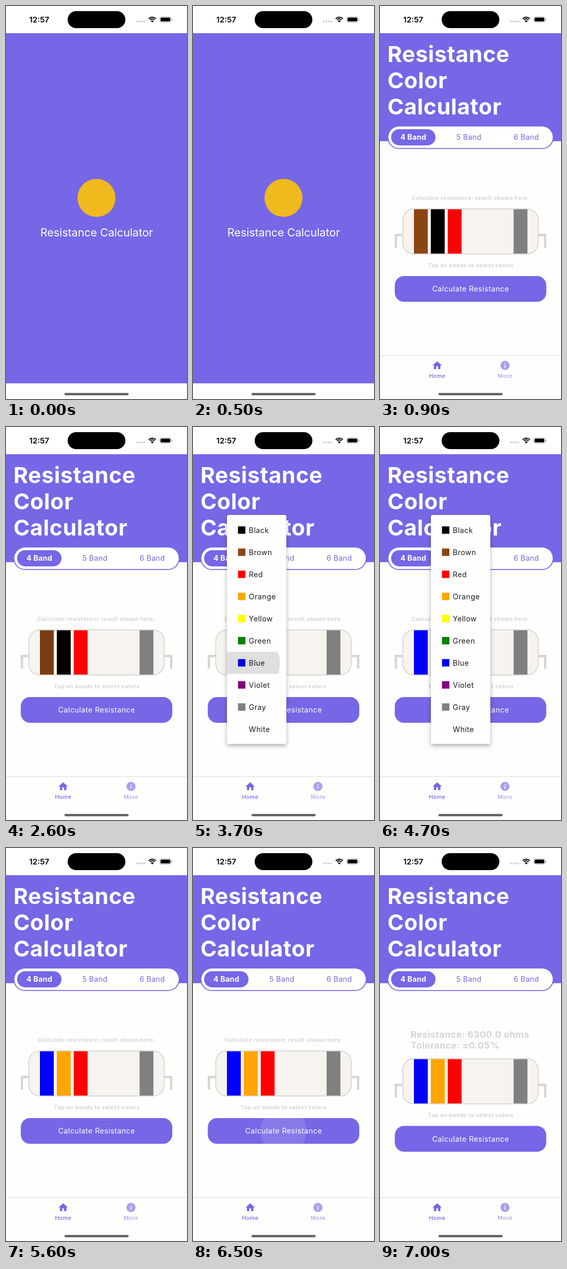
Write an HTML page with a canvas that moves like this. It is 352 px wide and 764 px high and loops after 8 s.

```html
<!DOCTYPE html>
<html lang="en">
<head>
<meta charset="utf-8">
<title>Resistance Calculator</title>
<style>
html, body { margin: 0; width: 100%; height: 100%; overflow: hidden; background: #fff; }
canvas { display: block; width: 352px; height: 764px; }
</style>
</head>
<body>
<canvas id="stage"></canvas>
<script>
const W = 352, H = 764, LOOP = 8000, STEP = 100;
const PURPLE = '#7567e6', PALE = '#aba0ef', GREY = '#d5d5d5', PAGE = '#fefefd', INK = '#1d1b20';
const TOP = 52.85, HEADER_END = 262.8;
const COLORS = [
  ['Black', '#000'], ['Brown', '#8b4513'], ['Red', '#f00'], ['Orange', '#ffa500'],
  ['Yellow', '#ff0'], ['Green', '#008000'], ['Blue', '#00f'], ['Violet', '#800080'],
  ['Gray', '#808080'], ['White', '#fff']
];
// Each menu: left edge, opening start, first visible time, tap, closing start, chosen row.
const MENUS = [
  { x: 66, open: 2800, shown: 3000, tap: 3500, seen: 3700, close: 3600, pick: 6 },
  { x: 99, open: 4400, shown: 4500, tap: 5200, seen: 5300, close: 5300, pick: 3 }
];
const PRESS = 6500, RESULT = 6700;

const canvas = document.getElementById('stage');
const ctx = canvas.getContext('2d');
const dpr = window.devicePixelRatio || 1;
canvas.width = W * dpr;
canvas.height = H * dpr;

const clamp = v => Math.max(0, Math.min(1, v));

function rect(x, y, w, h, color) {
  ctx.fillStyle = color;
  ctx.fillRect(x, y, w, h);
}

function roundPath(x, y, w, h, r) {
  ctx.beginPath();
  ctx.roundRect(x, y, w, h, r);
}

function pill(x, y, w, h, r, color) {
  roundPath(x, y, w, h, r);
  ctx.fillStyle = color;
  ctx.fill();
}

function disc(x, y, r, color) {
  ctx.beginPath();
  ctx.arc(x, y, r, 0, 2 * Math.PI);
  ctx.fillStyle = color;
  ctx.fill();
}

function text(str, x, y, size, color, { weight = 400, spacing = 0, align = 'left' } = {}) {
  ctx.font = `${weight} ${size}px Inter, sans-serif`;
  ctx.letterSpacing = spacing + 'px';
  ctx.textAlign = align;
  ctx.fillStyle = color;
  // Centered text carries a trailing space; shift by half of it.
  ctx.fillText(str, align === 'center' ? x + spacing / 2 : x, y);
}

function drawStatusBar() {
  text('12:57', 64.7, 31.8, 15.2, '#000', { weight: 600, align: 'center' });
  pill(119.9, 10, 112.3, 33, 16.5, '#000');
  for (let i = 0; i < 4; i++) disc(254.6 + i * 4.7, 30, 1.8, '#c8c8c8');

  ctx.strokeStyle = '#000';
  ctx.lineWidth = 2;
  for (const r of [9.6, 6.2]) {
    ctx.beginPath();
    ctx.arc(284.5, 31.3, r, -Math.PI * 0.76, -Math.PI * 0.24);
    ctx.stroke();
  }
  ctx.beginPath();
  ctx.moveTo(284.5, 32);
  ctx.arc(284.5, 31.8, 3.8, -Math.PI * 0.76, -Math.PI * 0.24);
  ctx.fillStyle = '#000';
  ctx.fill();

  roundPath(299, 21, 22, 10.6, 3.4);
  ctx.strokeStyle = '#a5a5a5';
  ctx.lineWidth = 1;
  ctx.stroke();
  pill(300.5, 22.5, 19, 7.6, 2.2, '#000');
  pill(322, 24.6, 1.3, 3.6, 0.6, '#a5a5a5');
}

function drawSplash() {
  rect(0, TOP, W, 733.55 - TOP, PURPLE);
  disc(176, 373, 37, '#f0b91e');
  text('Resistance Calculator', 176.3, 447.5, 21.5, '#fff', { spacing: -0.03, align: 'center' });
}

function drawHeader() {
  rect(0, TOP, W, HEADER_END - TOP, PURPLE);
  ['Resistance', 'Color', 'Calculator'].forEach((word, i) =>
    text(word, 14.4, 108.8 + i * 51.3, 43, '#fff', { weight: 700, spacing: 0.58 }));
  pill(14.4, 232.4, 323.4, 45.7, 22.8, PURPLE);
  pill(16.2, 234.2, 319.8, 42.1, 21, '#fff');
  pill(21.6, 239.5, 86.3, 31.4, 15.7, PURPLE);
  const tab = { spacing: 0.28, align: 'center' };
  text('4 Band', 64.7, 260.4, 14.3, '#fff', { ...tab, weight: 700 });
  text('5 Band', 172.8, 260.4, 14.3, PURPLE, tab);
  text('6 Band', 284.3, 260.4, 14.3, PURPLE, tab);
}

function drawResistor(y, bands) {
  rect(28.7, y + 49, 16, 4.5, GREY);
  rect(28.7, y + 49, 4.5, 27, GREY);
  rect(308, y + 49, 15.4, 4.5, GREY);
  rect(318.9, y + 49, 4.5, 27, GREY);
  pill(43.4, y - 0.5, 265.2, 89.5, 22.5, GREY);
  pill(45.2, y + 1.2, 261.6, 86.1, 20.8, '#f7f3ee');
  [66, 98.9, 131.8, 259.8].forEach((x, i) => rect(x, y + 1.2, 26.9, 86.1, bands[i]));
}

function drawButton(y, t) {
  pill(28.7, y, 294.7, 50.1, 18, PURPLE);
  const age = t - PRESS;
  if (age >= 0 && age < 500) {
    ctx.save();
    roundPath(28.7, y, 294.7, 50.1, 18);
    ctx.clip();
    const alpha = 0.12 * clamp((500 - age) / 300);
    disc(176, y + 25, 45 + age * 0.5, `rgba(255,255,255,${alpha})`);
    ctx.restore();
  }
  text('Calculate Resistance', 176, y + 30.4, 14.3, '#fff', { spacing: 0.45, align: 'center' });
}

function icon(path, x, color) {
  ctx.save();
  ctx.translate(x - 10.75, 688);
  ctx.scale(0.8957, 0.8957);
  ctx.fillStyle = color;
  ctx.fill(new Path2D(path), 'evenodd');
  ctx.restore();
}

function drawNav() {
  rect(0, 679, W, 1.2, '#dedede');
  icon('M10 20v-6h4v6h5v-8h3L12 3 2 12h3v8z', 111.2, PURPLE);
  icon('M12 2a10 10 0 1 0 0 20a10 10 0 1 0 0-20zM11 17h2v-6h-2zM11 9h2V7h-2z', 243, PALE);
  const label = { weight: 500, spacing: 0.45, align: 'center' };
  text('Home', 111, 723.2, 10.75, PURPLE, label);
  text('More', 243, 723.2, 10.75, PALE, label);
}

function drawPage(t) {
  rect(0, HEADER_END, W, H - HEADER_END, PAGE);
  drawHeader();
  const done = t >= RESULT;
  const shift = done ? 15.3 : 0;
  const note = { weight: 700, spacing: 0.47, align: 'center' };
  if (done) {
    const style = { weight: 700, spacing: 0.3 };
    text('Resistance: 6300.0 ohms', 59.7, 368.6, 17.9, GREY, style);
    text('Tolerance: ±0.05%', 59.7, 390, 17.9, GREY, style);
  } else {
    text('Calculate resistance; result shown here.', 175.8, 376.8, 10.75, GREY, note);
  }
  const first = t < 2600 ? '#8b4513' : t < 3700 ? '#7a3c11' : '#00f';
  const second = t < 5400 ? '#000' : '#ffa500';
  drawResistor(394 + shift, [first, second, '#f00', '#808080']);
  text('Tap on bands to select colors', 176.3, 507.8 + shift, 10.75, GREY, note);
  drawButton(525 + shift, t);
  drawNav();
}

function menuProgress(m, t) {
  if (t < m.shown) return 0;
  const opened = clamp((t - m.open) / 300);
  const closed = clamp((1 - (t - m.close) / 300) * 1.5);
  return Math.min(opened, closed);
}

function drawMenu(m, t) {
  const p = menuProgress(m, t);
  if (p <= 0) return;
  const top = 171, width = 115.5, row = 43, unit = 1 / (COLORS.length + 1.5);
  const height = 445 * clamp(p / (unit * COLORS.length));
  const fade = clamp(p * 3);

  ctx.save();
  ctx.globalAlpha = fade;
  ctx.shadowColor = 'rgba(0,0,0,0.3)';
  ctx.shadowBlur = 9 * dpr;
  ctx.shadowOffsetY = 4 * dpr;
  pill(m.x, top, width, height, 3.6, '#fefefe');
  ctx.shadowColor = 'transparent';
  roundPath(m.x, top, width, height, 3.6);
  ctx.clip();

  COLORS.forEach(([name, color], i) => {
    const mid = top + 29.4 + i * row;
    ctx.globalAlpha = fade * clamp((p - (i + 1) * unit) / (1.5 * unit));
    if (name !== 'White') rect(m.x + 21.5, mid - 7.2, 14.4, 14.4, color);
    text(name, m.x + 42.6, mid + 5.2, 14.3, INK, { spacing: 0.45 });
  });

  if (t >= m.seen) {
    const mid = top + 29.5 + m.pick * row;
    ctx.globalAlpha = fade;
    ctx.beginPath();
    ctx.rect(m.x, mid - row / 2, width, row);
    ctx.clip();
    disc(m.x + 43, mid, (t - m.tap) * 0.3, 'rgba(0,0,0,0.12)');
  }
  ctx.restore();
}

function draw(t) {
  ctx.setTransform(dpr, 0, 0, dpr, 0, 0);
  rect(0, 0, W, H, '#fff');
  if (t < 900) drawSplash();
  else {
    drawPage(t);
    MENUS.forEach(m => drawMenu(m, t));
  }
  drawStatusBar();
  pill(113.7, 752.2, 124.8, 4.6, 2.3, '#606060');
}

const start = performance.now();
function tick() {
  const t = (performance.now() - start) % LOOP;
  draw(Math.floor(t / STEP) * STEP);
  requestAnimationFrame(tick);
}
tick();
</script>
</body>
</html>
```
